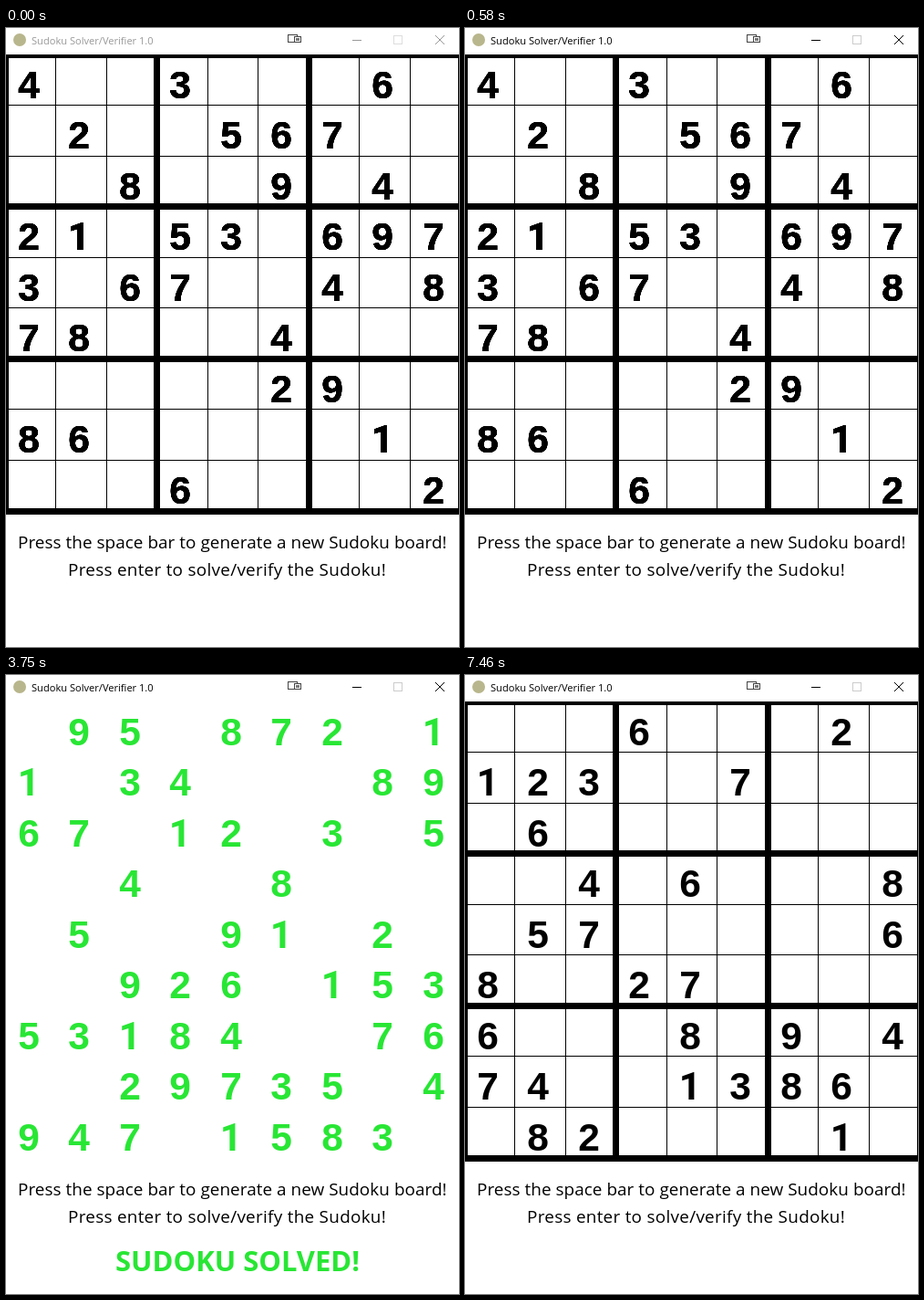
Animation, 497 px wide and 678 px high, one loop 8000 ms. Source, as an HTML page with a canvas:

```html
<!DOCTYPE html>
<html lang="en">
<head>
<meta charset="utf-8">
<title>Sudoku Solver/Verifier 1.0</title>
<style>
html, body { margin: 0; width: 100%; height: 100%; overflow: hidden; background: #fff; }
canvas { display: block; }
</style>
</head>
<body>
<canvas id="stage" width="497" height="678"></canvas>
<script>
const W = 497, H = 678, LOOP = 8000, TOP = 29, BOARD = 504;
const GREEN = '#28e634';
const ctx = document.getElementById('stage').getContext('2d');
const cell = k => Math.floor(k * 500 / 9);

const solved = '495387261123456789678129345214538697356791428' +
  '789264153531842976862973514947615832';
const puzzle = '4..3...6..2..567....8..9.4.21.53.6973.67..4.8' +
  '78...4........29..86.....1....6....2';
const nextPuzzle = '...6...2.123..7....6.........4.6...8.57.....6' +
  '8..27....6...8.9.474..1386..82....1.';
const answers = [...solved].map((d, i) => puzzle[i] === '.' ? d : '.').join('');

function text(str, x, y, font, color, align = 'left', spacing = 0) {
  ctx.font = font;
  ctx.fillStyle = color;
  ctx.textAlign = align;
  ctx.letterSpacing = spacing + 'px';
  ctx.fillText(str, x, y);
}

function box(x, y, w, h, color) {
  ctx.fillStyle = '#fff';
  ctx.fillRect(x, y, w, h);
  ctx.strokeStyle = color;
  ctx.lineWidth = 1;
  ctx.strokeRect(x + 0.5, y + 0.5, w - 1, h - 1);
}

function titleBar(active, showBadge) {
  const ink = active ? '#000' : '#999';
  ctx.fillStyle = '#b8b68c';
  ctx.beginPath();
  ctx.arc(15, 13, 7, 0, Math.PI * 2);
  ctx.fill();
  text('Sudoku Solver/Verifier 1.0', 28, 18, '11.1px "Open Sans", sans-serif', ink);

  if (showBadge) {
    box(309, 7, 11, 9, '#444');
    box(316, 9, 8, 7, '#444');
    ctx.fillStyle = '#777';
    ctx.fillRect(318, 11, 4, 3);
  }

  ctx.fillStyle = ink;
  ctx.fillRect(380, 13, 10, 1);
  box(425, 8, 10, 10, active ? '#ccc' : '#ddd');
  ctx.strokeStyle = ink;
  ctx.beginPath();
  ctx.moveTo(471, 8);
  ctx.lineTo(481, 18);
  ctx.moveTo(481, 8);
  ctx.lineTo(471, 18);
  ctx.stroke();
}

function grid() {
  ctx.save();
  ctx.beginPath();
  ctx.rect(0, TOP, W, BOARD);
  ctx.clip();
  ctx.fillStyle = '#000';
  for (let k = 0; k <= 9; k++) {
    const x = cell(k) - 1, y = TOP + cell(k);
    const half = k % 3 ? 0 : 3, w = 2 * half + 1;
    ctx.fillRect(x - half, TOP, w, BOARD);
    ctx.fillRect(0, y - half, W, w);
  }
  ctx.restore();
}

// Painting the same digits several times hardens their soft edges.
function digits(board, color, coats) {
  [...board].forEach((d, i) => {
    if (d === '.') return;
    const x = 25 + cell(i % 9), y = 77 + cell(Math.floor(i / 9));
    const family = d === '1' ? 'Roboto' : '"Liberation Sans"';
    for (let n = 0; n < coats; n++) {
      text(d, x, y, `bold 42.5px ${family}, sans-serif`, color, 'center');
    }
  });
}

function messages(done) {
  const font = '18.9px "Open Sans", sans-serif';
  text('Press the space bar to generate a new Sudoku board!', 13, 570, font, '#000', 'left', 0.05);
  text('Press enter to solve/verify the Sudoku!', 68, 600, font, '#000', 'left', 0.28);
  if (done) text('SUDOKU SOLVED!', 120, 653, 'bold 31px "Open Sans", sans-serif', GREEN);
}

function draw(t) {
  const done = t >= 3750 && t < 7460;
  const blank = t >= 3750 && t < 3820;
  const coats = blank || t >= 7460 ? 1 : 6;
  ctx.fillStyle = '#fff';
  ctx.fillRect(0, 0, W, H);
  titleBar(t >= 580, t < 550 || t >= 580);
  if (!blank) {
    grid();
    digits(t < 7460 ? puzzle : nextPuzzle, '#000', coats);
  }
  if (done) digits(answers, GREEN, coats);
  messages(done);
}

const start = performance.now();
function tick() {
  draw((performance.now() - start) % LOOP);
  requestAnimationFrame(tick);
}
tick();
</script>
</body>
</html>
```
